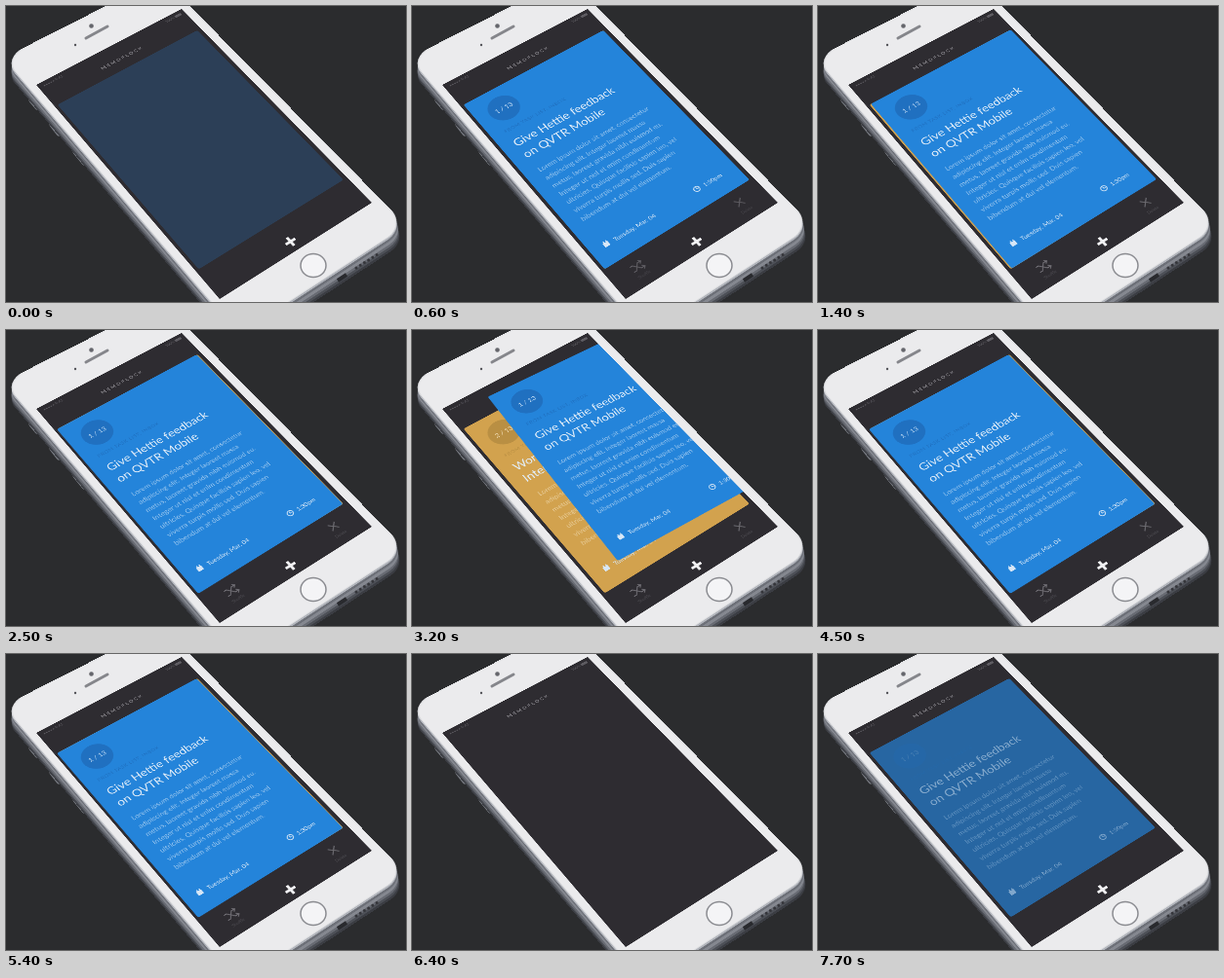
Write an HTML page that moves like this. It is 410 px wide and 304 px high and loops after 7900 ms.

```html
<!DOCTYPE html>
<html lang="en">
<head>
<meta charset="utf-8">
<title>Task cards</title>
<style>
  html, body { margin: 0; width: 100%; height: 100%; overflow: hidden; background: #2b2c2e; }
  #stage { position: relative; width: 410px; height: 304px; overflow: hidden; }
  #stage > svg { position: absolute; inset: 0; }
  #phone { position: absolute; left: 0; top: 0; width: 320px; height: 568px; transform-origin: 0 0; }
  #face {
    position: absolute; left: -15px; top: -92px; width: 352px; height: 732px;
    border-radius: 42px; background: #ebebed;
    box-shadow: inset 0 0 0 1.5px #d6d7da, -2px 3px #b0b3ba, -4px 7px #6d7078, -7px 12px #858890,
      -10px 16px #686b73, -12px 20px #4d5057, -14px 24px #3b3d43;
  }
  #screen { position: absolute; left: 0; top: 0; background: #2e2c31; overflow: hidden; }
  text { font-family: Lato, "Open Sans", sans-serif; }
</style>
</head>
<body>
<div id="stage">
  <svg width="410" height="304" stroke="#73767d" stroke-width="5" stroke-linecap="round">
    <path d="M26 97l6 7M47 122l7 9M71 150l9 11"/>
  </svg>
  <div id="phone">
    <div id="face"></div>
    <svg id="screen" width="320" height="568" viewBox="0 0 320 568">
      <g fill="#5d5b61" font-size="8">
        <text x="9" y="13">••••• 9:41</text>
        <text x="276" y="13">100%</text>
        <rect x="298" y="7" width="14" height="6" rx="1"/>
      </g>
      <text x="161" y="41" text-anchor="middle" font-size="10" letter-spacing="3" fill="#a3a1a7">MEMOFLOCK</text>
      <g id="tools" fill="none" stroke="#6d6b71" stroke-width="1.8">
        <path d="M41 523h5l10 12h6M41 535h5l10-12h6M59 519l4 4-4 4M59 531l4 4-4 4"/>
        <path d="M261 521l14 14m0-14l-14 14"/>
        <g fill="#4c4a50" stroke="none" font-size="8" text-anchor="middle">
          <text x="52" y="551">Shuffle</text>
          <text x="268" y="551">Delete</text>
        </g>
      </g>
      <path id="plus" d="M150 548h20M160 538v20" stroke="#f2f2f4" stroke-width="5"/>
      <g id="cards"></g>
    </svg>
  </div>
  <svg width="410" height="304" fill="none">
    <path d="M82 33l22-12" stroke="#85868b" stroke-width="3" stroke-linecap="round"/>
    <circle cx="87.5" cy="20.5" r="2.3" fill="#66676d"/>
    <circle cx="71" cy="40" r="1.2" fill="#55565b"/>
    <ellipse cx="315" cy="266.5" rx="13" ry="12" fill="#f4f4f6" stroke="#8b8c91" stroke-width="1.5"/>
    <path d="M340 282l9-6" stroke="#292a2e" stroke-width="4"/>
    <path d="M359 269l25-16" stroke="#35363b" stroke-width="3" stroke-linecap="round" stroke-dasharray="0 5"/>
  </svg>
</div>
<script>
const LOOP = 7900, CYCLE = 7500;
const $ = id => document.getElementById(id);
const clamp = x => Math.max(0, Math.min(1, x));
const ramp = (t, from, to) => clamp((t - from) / (to - from));
const ease = x => x * x * (3 - 2 * x);

// Perspective transform taking a w x h box onto four corners (clockwise from top left)
function project(w, h, [[x0, y0], [x1, y1], [x2, y2], [x3, y3]]) {
  const ax = x1 - x2, ay = y1 - y2, bx = x3 - x2, by = y3 - y2;
  const sx = x0 - x1 + x2 - x3, sy = y0 - y1 + y2 - y3;
  const det = ax * by - ay * bx;
  const g = (sx * by - sy * bx) / det, k = (ax * sy - ay * sx) / det;
  return `matrix3d(${[
    (x1 - x0 + g * x1) / w, (y1 - y0 + g * y1) / w, 0, g / w,
    (x3 - x0 + k * x3) / h, (y3 - y0 + k * y3) / h, 0, k / h,
    0, 0, 1, 0, x0, y0, 0, 1]})`;
}
$('phone').style.transform = project(320, 568, [[31, 81], [180, 3], [375, 202], [219, 301]]);

const BODY = [
  'Lorem ipsum dolor sit amet, consectetur',
  'adipiscing elit. Integer laoreet massa',
  'metus, laoreet gravida nibh euismod eu.',
  'Integer ut nisl et enim condimentum',
  'ultricies. Quisque facilisis sapien leo, vel',
  'viverra turpis mollis sed. Duis sapien',
  'bibendum at dui vel elementum.'];

const lines = (list, x, y, step) =>
  list.map((s, i) => `<text x="${x}" y="${y + i * step}">${s}</text>`).join('');

function card(id, fill, dark, pale, count, title) {
  return `<g id="${id}">
    <rect class="base" x="6" y="63" width="306" height="438" rx="4" fill="${fill}"/>
    <g class="badge">
      <circle cx="60" cy="112" r="29" fill="${dark}"/>
      <text x="60" y="117" text-anchor="middle" font-size="13" fill="${pale}">${count}</text>
      <text x="31" y="163" font-size="10" letter-spacing=".8" fill="${dark}">FROM TASK LIST, INBOX</text>
    </g>
    <g class="copy" fill="${pale}">
      <g font-size="23" fill="#e2edf8">${lines(title, 30, 201, 31)}</g>
      <g font-size="13.4" opacity=".7">${lines(BODY, 32, 271, 21.6)}</g>
      <g font-size="11.5" fill="#d8e7f6">
        <text x="52" y="467">Tuesday, Mar. 04</text>
        <text x="241" y="467">1:30pm</text>
        <path d="M32 458h10v9h-10zM34 455h2v3h-2zM39 455h2v3h-2z"/>
        <path d="M227 458v4h4" fill="none" stroke="#d8e7f6" stroke-width="1.4"/>
        <circle cx="227" cy="462" r="5.5" fill="none" stroke="#d8e7f6" stroke-width="1.6"/>
      </g>
    </g>
  </g>`;
}
$('cards').innerHTML =
  card('next', '#d2a24e', '#b98f43', '#f0dcb4', '2 / 13', ['Work on portfolio', 'Interface design']) +
  card('top', '#2484da', '#2070c0', '#c6dff6', '1 / 13', ['Give Hettie feedback', 'on QVTR Mobile']);

const part = name => $('top').querySelector('.' + name).style;
const base = part('base'), badge = part('badge'), copy = part('copy');

// Pull to the right, short hold, release
const pull = (t, start, hold, back, end) => ease(ramp(t, start, hold)) - ease(ramp(t, back, end));

function draw(now) {
  const t = now % LOOP;
  const p = t > 6600 ? t - CYCLE : t;   // the tail already runs into the next cycle
  const out = 1 - ramp(p, 5500, 6200);
  base.opacity = ramp(p, -100, 350) * out;
  copy.opacity = ramp(p, 0, 400) * out;
  badge.opacity = ramp(p, 130, 500) * out;
  $('tools').style.opacity = ramp(p, 300, 700) * out;
  $('plus').style.opacity = ramp(p, -600, -300) * out;

  // After the first pull the card rests a hair left of the one below
  const rest = 0.02 * ease(ramp(p, 1950, 2450));
  const k = pull(p, 1330, 1930, 1950, 2450) + pull(p, 2600, 3200, 3400, 4100) - rest;
  $('top').setAttribute('transform', `translate(${66 * k} ${-33 * k * k}) rotate(${2.8 * k} 160 282)`);
  $('next').style.display = p > 400 && p < 5500 ? '' : 'none';
}

const start = performance.now();
function tick() {
  draw(performance.now() - start);
  requestAnimationFrame(tick);
}
tick();
</script>
</body>
</html>
```
